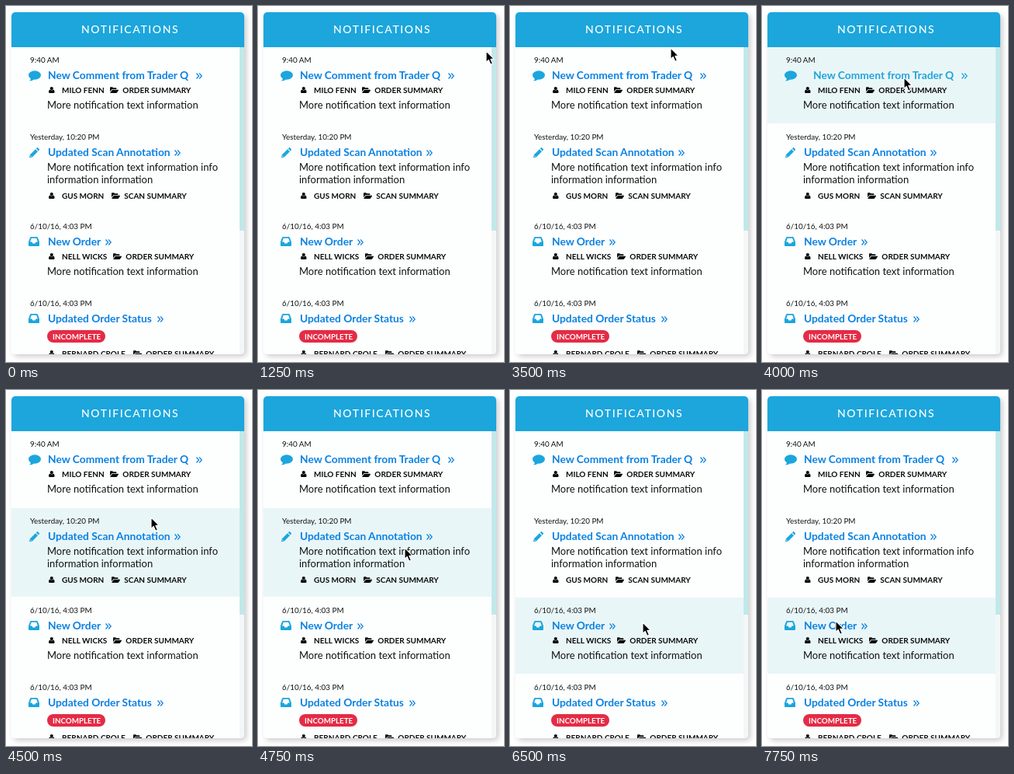
An HTML page for the animation above (8 s loop, 317x458 px).

```html
<!DOCTYPE html>
<html lang="en">
<head>
<meta charset="utf-8">
<title>Notifications</title>
<style>
  html, body { margin: 0; width: 100%; height: 100%; overflow: hidden; background: #fff; }
  svg { display: block; width: 317px; height: 458px; font-family: Lato, "Open Sans", sans-serif; }
  .head { font-size: 14px; font-weight: 500; letter-spacing: 1.6px; fill: #fff; }
  .time { font-size: 9.9px; fill: #111; }
  .title { font-size: 13.8px; font-weight: 700; }
  .meta { font-size: 10px; font-weight: 700; fill: #0a0a0a; }
  .body { font-size: 13px; fill: #111; }
  .badge { font-size: 9.8px; font-weight: 700; fill: #fff; }
</style>
</head>
<body>
<svg viewBox="0 0 317 458">
  <defs>
    <filter id="shade" x="-10%" y="-10%" width="120%" height="120%">
      <feDropShadow dx="3" dy="3" stdDeviation="3.5" flood-color="#000" flood-opacity=".2"/>
    </filter>
    <clipPath id="card"><rect x="7" y="8" width="300" height="440" rx="5"/></clipPath>
    <g id="comment" fill="#1ba6dd">
      <ellipse cx="8" cy="6" rx="8" ry="5.8"/>
      <path d="M3 9Q3.2 12 1 13.6Q5 13.6 7.5 11Z"/>
    </g>
    <g id="pencil" fill="#1ba6dd">
      <path d="M0 13.2L.8 9.4 8 2.2 11 5.2 3.8 12.4ZM8.8 1.4L9.8.4Q10.5-.2 11.2.4L12.8 2Q13.4 2.7 12.8 3.4L11.8 4.4Z"/>
      <path d="M1.2 10.6L2.6 12" stroke="#fff" stroke-width=".9"/>
    </g>
    <path id="inbox" fill="#1ba6dd" fill-rule="evenodd"
      d="M3.4 0H10.6Q11.6 0 12 1L14 6.6V11Q14 12 13 12H1Q0 12 0 11V6.6L2 1Q2.4 0 3.4 0ZM3.8 1.8L2.1 6.6H4.5L5.4 8.5H8.6L9.5 6.6H11.9L10.2 1.8Z"/>
    <g id="user" fill="#0a0a0a">
      <circle cx="3.8" cy="2.1" r="2.1"/>
      <path d="M1.6 3.6Q3.8 5.6 6 3.6Q7.6 4.2 7.6 6.8Q7.5 8 6.4 8H1.2Q.1 8 0 6.8Q0 4.2 1.6 3.6Z"/>
    </g>
    <path id="folder" fill="#0a0a0a"
      d="M0 6.3V1Q0 .2.8.2H3Q3.8.2 3.8 1V1.3H7.6Q8.4 1.3 8.4 2.1V3H3.4Q2.5 3 1.9 3.8ZM.3 7.6L2.4 4.4Q2.8 3.8 3.5 3.8H10.6Q11.4 3.8 11 4.5L9.2 7.2Q8.7 7.9 8 7.9H.6Q0 7.9.3 7.6Z"/>
    <path id="more" fill="none" stroke="currentColor" stroke-width="1.2" d="M.5.5L3.6 4 .5 7.5M4.1.5L7.2 4 4.1 7.5"/>
  </defs>

  <rect x="7" y="8" width="300" height="440" rx="5" fill="#fdfefe" filter="url(#shade)"/>
  <g clip-path="url(#card)">
    <g id="list"></g>
    <rect x="301" y="53" width="6" height="395" fill="#f4f7f7"/>
    <rect x="301" y="53" width="6" height="236" fill="#c1e8ea"/>
    <rect x="7" y="8" width="300" height="45" fill="#1ca6dc"/>
    <text class="head" x="97" y="35">NOTIFICATIONS</text>
  </g>
  <path id="cursor" fill="#000" stroke="#fff" stroke-width="1.1" stroke-linejoin="round"
    d="M0 0V14.4L3.2 11.4 5.8 17.2 8.3 16.1 5.8 10.4H10.3Z"/>
</svg>
<script>
const LOOP = 8000, STEP = 250;
const BLUE = "#0b82e2", HOVER = "#22a4da";

// Offsets inside a row are measured from its top edge.
const rows = [
  { top: 53, h: 98, time: "9:40 AM", icon: "comment", title: "New Comment from Trader Q", end: 245,
    meta: 59, who: "MILO FENN", folder: 134, label: "ORDER SUMMARY",
    lines: [[79, "More notification text information"]] },
  { top: 152, h: 114, time: "Yesterday, 10:20 PM", icon: "pencil", title: "Updated Scan Annotation", end: 217,
    meta: 96, who: "GUS MORN", folder: 136, label: "SCAN SUMMARY",
    lines: [[60, "More notification text information info"], [76, "information information"]] },
  { top: 267, h: 98, time: "6/10/16, 4:03 PM", icon: "inbox", title: "New Order", end: 128,
    meta: 59, who: "NELL WICKS", folder: 138, label: "ORDER SUMMARY",
    lines: [[79, "More notification text information"]] },
  { top: 366, h: 98, time: "6/10/16, 4:03 PM", icon: "inbox", title: "Updated Order Status", end: 195,
    meta: 85, who: "BERNARD CROLE", folder: 164, label: "ORDER SUMMARY", lines: [], badge: "INCOMPLETE" }
];

// time, x, y of the pointer tip
const path = [
  [750, 299, 17], [1000, 299, 17], [1250, 294, 58], [1500, 262, 72], [1750, 218, 87],
  [2000, 194, 91], [2250, 185, 91], [2500, 182, 91], [3000, 181, 93], [3250, 181, 93],
  [3500, 207, 54], [3750, 191, 80], [4000, 183, 92], [4250, 184, 98], [4500, 187, 164],
  [4750, 189, 203], [5250, 189, 212], [5750, 183, 256], [6000, 177, 284], [6250, 172, 297],
  [6500, 171, 299], [7000, 158, 300], [7500, 109, 298], [7750, 95, 297]
];

const text = (cls, x, y, s) => `<text class="${cls}" x="${x}" y="${y}">${s}</text>`;
const use = (id, x, y) => `<use href="#${id}" x="${x}" y="${y}"/>`;

function rowMarkup(r) {
  const y = r.top, m = y + r.meta;
  const badge = r.badge
    ? `<rect x="53" y="${y + 51}" width="75" height="16" rx="8" fill="#e52b45"/>` + text("badge", 60, y + 62.5, r.badge)
    : "";
  return `<g><rect class="tint" x="7" y="${y}" width="294" height="${r.h}" fill="#e9f6f8"/>` +
    text("time", 31, y + 20, r.time) +
    use(r.icon, r.icon === "pencil" ? 30 : 29, y + 30) +
    `<g class="link">${text("title", 54, y + 41, r.title)}${use("more", r.end, y + 33)}</g>` +
    use("user", 55, m - 8) + text("meta", 72, m, r.who) +
    use("folder", r.folder, m - 8) + text("meta", r.folder + 16.3, m, r.label) +
    r.lines.map(([dy, s]) => text("body", 53, y + dy, s)).join("") + badge + "</g>";
}

const list = document.getElementById("list");
const cursor = document.getElementById("cursor");
list.innerHTML = rows.map(rowMarkup).join("");
const tints = list.querySelectorAll(".tint");
const links = list.querySelectorAll(".link");

function pointer(t) {
  const i = path.findIndex(p => p[0] >= t);
  if (i < 1) return path[0].slice(1);
  const [t0, x0, y0] = path[i - 1], [t1, x1, y1] = path[i];
  const k = (t - t0) / (t1 - t0);
  return [x0 + (x1 - x0) * k, y0 + (y1 - y0) * k];
}

function draw(now) {
  const t = Math.floor((now % LOOP) / STEP) * STEP;
  const [x, y] = pointer(t);
  cursor.setAttribute("visibility", t < path[0][0] ? "hidden" : "visible");
  cursor.setAttribute("transform", `translate(${x} ${y})`);
  rows.forEach((r, i) => {
    const over = t >= 3750 && y >= r.top && y < r.top + r.h;
    const linked = i === 0 && (t === 4000 || t === 4250);
    const color = linked ? HOVER : BLUE;
    tints[i].setAttribute("opacity", over ? 1 : 0);
    links[i].setAttribute("transform", `translate(${linked ? 12 : 0} 0)`);
    links[i].setAttribute("fill", color);
    links[i].setAttribute("color", color);
  });
}

let start;
function tick(now) {
  start ??= now;
  draw(now - start);
  requestAnimationFrame(tick);
}
draw(0);
requestAnimationFrame(tick);
</script>
</body>
</html>
```
